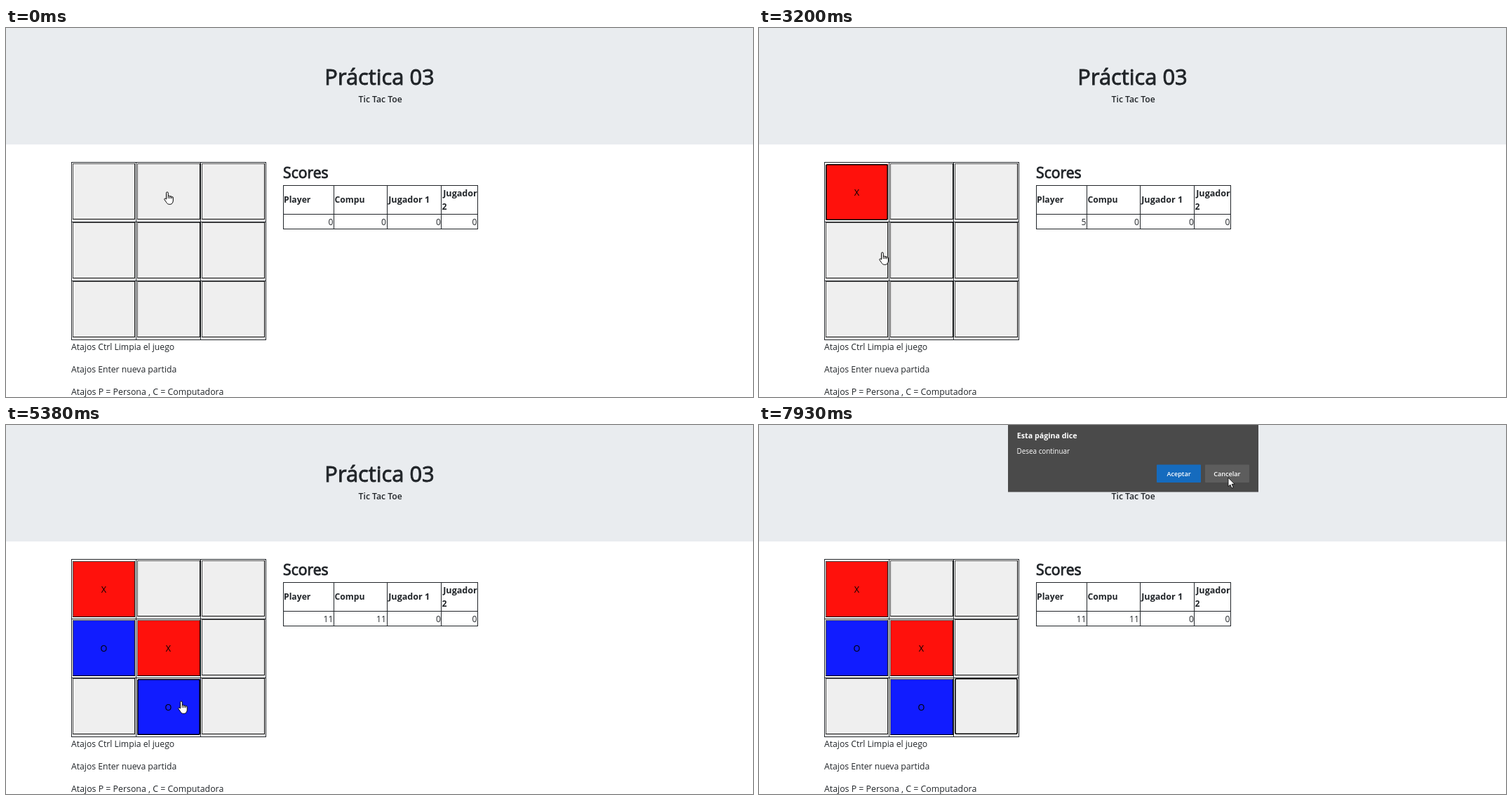
An HTML page for the animation above (8000 ms loop, 1065 by 526 pixels).

```html
<!DOCTYPE html>
<html lang="es">
<head>
<meta charset="utf-8">
<title>Tic Tac Toe</title>
<style>
  html, body { margin: 0; width: 100%; height: 100%; overflow: hidden; background: #fff; }
  svg { display: block; font-family: "Open Sans", "Noto Sans", sans-serif; font-size: 12.2px; }
  text { fill: #212529; white-space: pre; }
  .heading { stroke: #212529; stroke-width: .9px; }
  .bold { font-weight: 700; }
  .semi { font-weight: 600; }
  .grid { fill: none; stroke: #212529; shape-rendering: crispEdges; }
  .edge { shape-rendering: crispEdges; }
  .mid { text-anchor: middle; }
  .end { text-anchor: end; }
  .mark { fill: #000; font-size: 12.6px; }
  .dialog text { fill: #fff; font-size: 9.9px; }
  .dialog .bold { font-size: 10.7px; }
  .dialog .semi { font-size: 9.1px; }
  .pointer path { fill: #fff; stroke: #000; stroke-linejoin: round; }
</style>
</head>
<body>
<svg width="1065" height="526" viewBox="0 0 1065 526">
  <rect width="1065" height="166" fill="#e9ecef"/>
  <text class="heading" x="454.3" y="81" font-size="30.9">Práctica 03</text>
  <text class="semi mid" x="533.7" y="106">Tic Tac Toe</text>

  <path class="grid" d="M93.5 191.5h277v253h-277zM185.5 191.5v253M277.5 191.5v253M93.5 276.5h277M93.5 360.5h277"/>
  <g id="board"></g>
  <text x="93" y="459">Atajos Ctrl Limpia el juego</text>
  <text x="93" y="491">Atajos Enter nueva partida</text>
  <text x="93" y="523" font-size="12.35">Atajos P = Persona , C = Computadora</text>

  <text class="heading" x="395" y="214" font-size="21.2">Scores</text>
  <path class="grid" d="M395.5 224.5h277v62h-277zM467.5 224.5v62M543.5 224.5v62M620.5 224.5v62M395.5 265.5h277"/>
  <g class="bold">
    <text x="396" y="249">Player</text>
    <text x="468.4" y="249">Compu</text>
    <text x="545.2" y="249" font-size="12.6">Jugador 1</text>
    <text x="623.2" y="240" font-size="12.6">Jugador</text>
    <text x="621.5" y="259">2</text>
  </g>
  <g class="end">
    <text id="player" x="466.5" y="280.5">0</text>
    <text id="compu" x="542" y="280.5">0</text>
    <text x="620" y="280.5">0</text>
    <text x="671.5" y="280.5">0</text>
  </g>

  <g class="dialog" id="dialog">
    <rect x="355" width="357" height="95.5" fill="#4a4a4a"/>
    <text class="bold" x="367.8" y="19">Esta página dice</text>
    <g id="winner">
      <text x="367.6" y="41">El Ganador fue Player 1</text>
      <rect id="accept" x="639" y="56.5" width="60" height="25.5" rx="1"/>
      <text class="semi mid" x="669" y="72.5">Aceptar</text>
    </g>
    <g id="confirm">
      <text x="367.6" y="41">Desea continuar</text>
      <rect x="567" y="56.5" width="63" height="25.5" rx="1" fill="#156bbe"/>
      <text class="semi mid" x="598.5" y="72.5">Aceptar</text>
      <rect x="636" y="56.5" width="63" height="25.5" rx="1" fill="#5d5d5d"/>
      <text class="semi mid" x="667.3" y="72.5">Cancelar</text>
    </g>
  </g>

  <g class="pointer" id="pointer">
    <g id="hand">
      <path d="M3.5 11V2.2a1.3 1.3 0 0 1 2.7 0V7a1.3 1.3 0 0 1 2.5.3v.4a1.2 1.2 0 0 1 2.4.4v.4a1.1 1.1 0 0 1 2.2.5V13c0 2.5-1.6 5.3-4 5.3H7.4c-1.7 0-2.8-1.2-3.6-2.6L.9 11.6c-.7-1.2.9-2.2 1.8-1.2z"/>
      <path d="M6.2 7v3M8.7 7.5v2.7M11.1 8.3v2"/>
    </g>
    <path id="arrow" stroke-width=".8" d="M0 0V12.6L2.9 10 5 15 7.2 14.1 5.1 9.3H9z"/>
  </g>
</svg>
<script>
const LOOP = 8000;
const byId = id => document.getElementById(id);
const show = (el, on) => el.setAttribute('visibility', on ? 'inherit' : 'hidden');

// Clicks on the board: time, cell, mark
const clicks = [[1140, 0, 'X'], [3600, 3, 'O'], [4210, 4, 'X'], [5000, 7, 'O'], [6070, 8, '']];
const colors = { X: '#ff110c', O: '#111cff' };

// Pointer moves: first step, last step, number of steps, x, y
const moves = [
  [70, 430, 6, 111, 221], [660, 810, 3, 127, 219], [980, 980, 1, 122, 216], [1140, 1140, 1, 128, 223],
  [1520, 1900, 6, 237, 314], [2060, 2360, 5, 217, 324], [2750, 2910, 3, 184, 319],
  [3120, 3600, 7, 120, 318], [3750, 4210, 7, 224, 309], [4440, 4750, 5, 234, 392],
  [5230, 5840, 9, 319, 398], [6240, 6240, 1, 319, 394],
  [6620, 6700, 2, 541, 67], [6780, 6780, 1, 528, 69],
  [7010, 7010, 1, 571, 73], [7090, 7630, 8, 669, 75]
];

// Buttons sit on a fractional layout and snap to whole pixels
const cells = Array.from({ length: 9 }, (_, i) => {
  const left = 94.8 + i % 3 * 92.2;
  const x = Math.round(left), y = 193 + Math.floor(i / 3) * 84;
  const w = Math.round(left + 89.6) - x, h = 80;
  const g = document.createElementNS('http://www.w3.org/2000/svg', 'g');
  g.innerHTML = `
    <rect class="edge" width="${w}" height="${h}"/>
    <g class="edge">
      <path d="M0 0H${w}V1H1V${h}H0z" fill="#4c4c4c"/>
      <path d="M${w} 0V${h}H0V${h - 1}H${w - 1}V0z"/>
    </g>
    <rect x=".8" y=".8" width="${w - 1.6}" height="${h - 1.6}" rx="2" fill="none" stroke="#000" stroke-width="1.6"/>
    <text class="mid mark" x="44.5" y="44.5"></text>`;
  byId('board').append(g);
  const [face, edge, ring, label] = g.children;
  return { g, face, edge, ring, label, x, y };
});

function pointerAt(t) {
  let x = 225, y = 233;
  for (const [t0, t1, n, toX, toY] of moves) {
    if (t < t0) break;
    const gap = n > 1 ? (t1 - t0) / (n - 1) : 1;
    const p = Math.min(n, Math.floor((t - t0) / gap + 1e-6) + 1) / n;
    const ease = p * p * (3 - 2 * p);
    x += (toX - x) * ease;
    y += (toY - y) * ease;
  }
  return [x, y];
}

function drawBoard(t) {
  const done = clicks.filter(c => t >= c[0]);
  const focus = done.length ? done[done.length - 1][1] : -1;
  cells.forEach((cell, i) => {
    const click = done.find(c => c[1] === i);
    const mark = click ? click[2] : '';
    cell.g.setAttribute('transform', `translate(${cell.x} ${cell.y + (mark ? 1 : 0)})`);
    cell.face.setAttribute('fill', colors[mark] || '#efefef');
    cell.face.setAttribute('rx', i === focus ? 2 : 0);
    cell.label.textContent = mark;
    show(cell.edge, i !== focus);
    show(cell.ring, i === focus);
  });
}

function draw(now) {
  const t = now % LOOP;
  drawBoard(t);
  byId('player').textContent = t < 1140 ? 0 : t < 4210 ? 5 : 11;
  byId('compu').textContent = t < 3600 ? 0 : t < 5000 ? 5 : 11;
  show(byId('dialog'), t >= 6310);
  show(byId('winner'), t >= 6310 && t < 7930);
  show(byId('confirm'), t >= 7930);
  byId('accept').setAttribute('fill', t < 7780 ? '#156bbe' : '#125ca3');
  const [x, y] = pointerAt(t);
  byId('pointer').setAttribute('transform', `translate(${Math.round(x)} ${Math.round(y)})`);
  show(byId('hand'), t < 6620);
  show(byId('arrow'), t >= 6620);
  requestAnimationFrame(() => draw(performance.now()));
}
draw(0);
</script>
</body>
</html>
```
